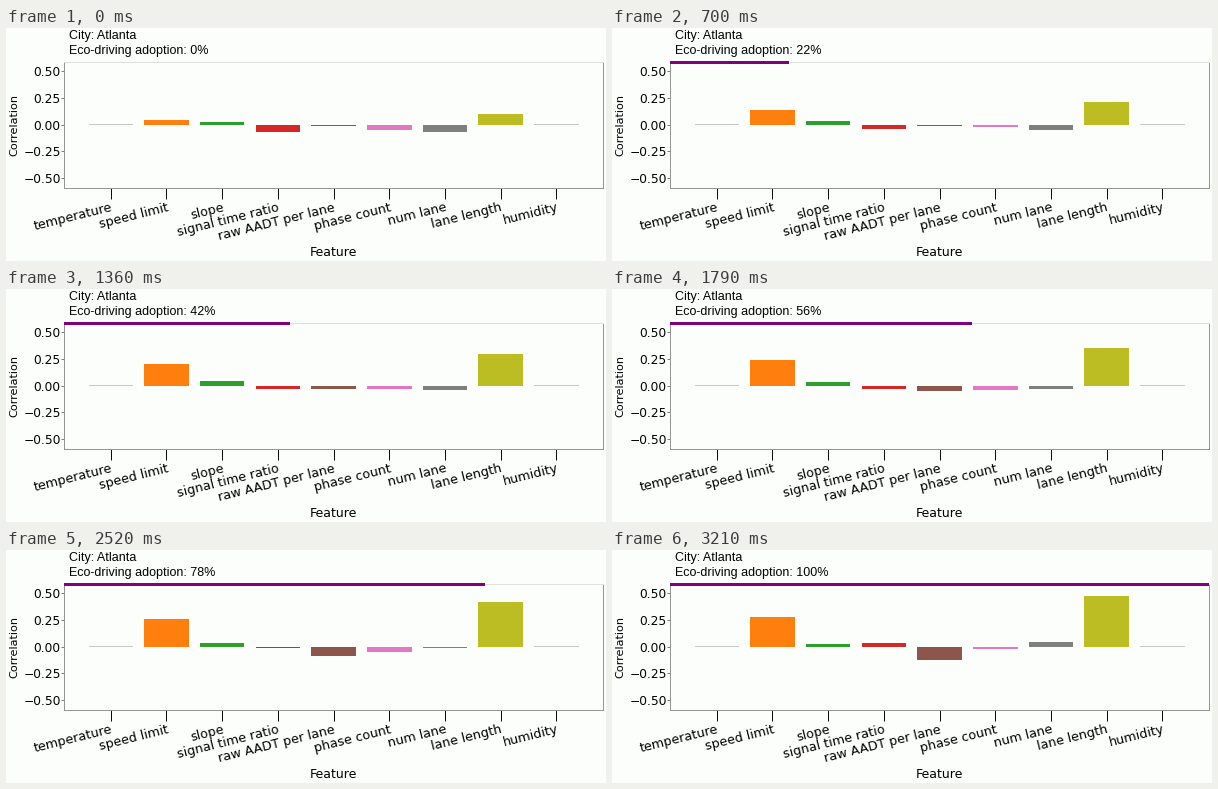
Animation of 600 by 233 pixels, one loop 3.27 s. Source, as a matplotlib script:

```python
import numpy as np
import matplotlib.pyplot as plt
from matplotlib.animation import FuncAnimation
from matplotlib.patches import Rectangle

W, H, DPI = 600, 233, 100
LOOP, STEP = 3270, 10
PACE = 32.3  # ms per percent of adoption
PX = 72 / DPI  # points per pixel

LEFT, RIGHT, TOP, BOTTOM = 58, 597.2, 34, 160
ZERO, UNIT = 96.6, 106.4  # pixel row of y = 0, pixels per unit
THIN = 0.009  # smallest visible bar

plt.rcParams["font.family"] = "DejaVu Sans"


def curve(start, end, hump=0.0, wave=0.0):
    """Straight drift from start to end plus a half and a full sine."""
    def value(s):
        v = (start + (end - start) * s
             + hump * np.sin(np.pi * s) + wave * np.sin(2 * np.pi * s))
        return np.copysign(max(abs(v), THIN), v)
    return value


FEATURES = {
    "temperature": ("#c4c8c8", curve(0, 0)),
    "speed limit": ("tab:orange", curve(.045, .280, .062, .004)),
    "slope": ("tab:green", curve(.020, .021, .018, .002)),
    "signal time ratio": ("tab:red", curve(-.065, .034, -.018, .011)),
    "raw AADT per lane": ("tab:brown", curve(-.012, -.122, .025, .004)),
    "phase count": ("tab:pink", curve(-.048, -.023, 0, .020)),
    "num lane": ("tab:gray", curve(-.071, .040, -.023, .007)),
    "lane length": ("tab:olive", curve(.098, .480, .042)),
    "humidity": ("#c4c8c8", curve(0, 0)),
}
colors, curves = zip(*FEATURES.values())
n = len(FEATURES)

fig = plt.figure(figsize=(W / DPI, H / DPI), dpi=DPI, facecolor="#fcfefc")
ax = fig.add_axes([LEFT / W, 1 - BOTTOM / H, (RIGHT - LEFT) / W, (BOTTOM - TOP) / H],
                  facecolor="none")
margin = 0.05 * (n - 0.2)
ax.set_xlim(-0.4 - margin, n - 0.6 + margin)
ax.set_ylim((ZERO - BOTTOM) / UNIT, (ZERO - TOP) / UNIT)
bars = ax.bar(range(n), [0] * n, width=0.8, color=colors)

ax.set_xticks(range(n), [""] * n)
ax.set_yticks(np.linspace(-0.5, 0.5, 5))
ax.tick_params(axis="x", length=11 * PX, width=0.95 * PX)
ax.tick_params(axis="y", length=3 * PX, width=0.8 * PX, pad=0.3 * PX,
               color="#606060", labelsize=12.2 * PX)
ax.spines[:].set(color="#909090", linewidth=0.95 * PX)
ax.spines["top"].set_color("#e0e0e0")

for i, name in enumerate(FEATURES):
    ax.annotate(name, (i, 0), xycoords=("data", "axes fraction"),
                xytext=(3 * PX, -13 * PX), textcoords="offset points",
                ha="right", va="top", rotation=14, fontsize=12.7 * PX)


def label(x, y, text, size=12.5, va="baseline", **kw):
    return fig.text(x / W, 1 - y / H, text, fontsize=size * PX, va=va, **kw)


label(327.5, 228, "Feature", ha="center")
label(13.5, 97, "Correlation", 11.2, va="center", ha="right", rotation=90)
label(63, 10.8, "City: Atlanta", family="Liberation Sans")
status = label(63, 25.8, "", family="Liberation Sans")

progress = Rectangle((LEFT / W, 1 - 36 / H), 0, 3 / H, transform=fig.transFigure,
                     color="#800080", linewidth=0, zorder=5)
fig.add_artist(progress)


def update(i):
    percent = min(100, int(i * STEP / PACE + 0.62))
    s = percent / 100
    for bar, value in zip(bars, curves):
        bar.set_height(value(s))
    progress.set_width((RIGHT - LEFT) / W * s)
    status.set_text(f"Eco-driving adoption: {percent}%")
    return [*bars, progress, status]


anim = FuncAnimation(fig, update, frames=LOOP // STEP, interval=STEP, repeat=True,
                     repeat_delay=0, blit=False)
plt.show()
```
